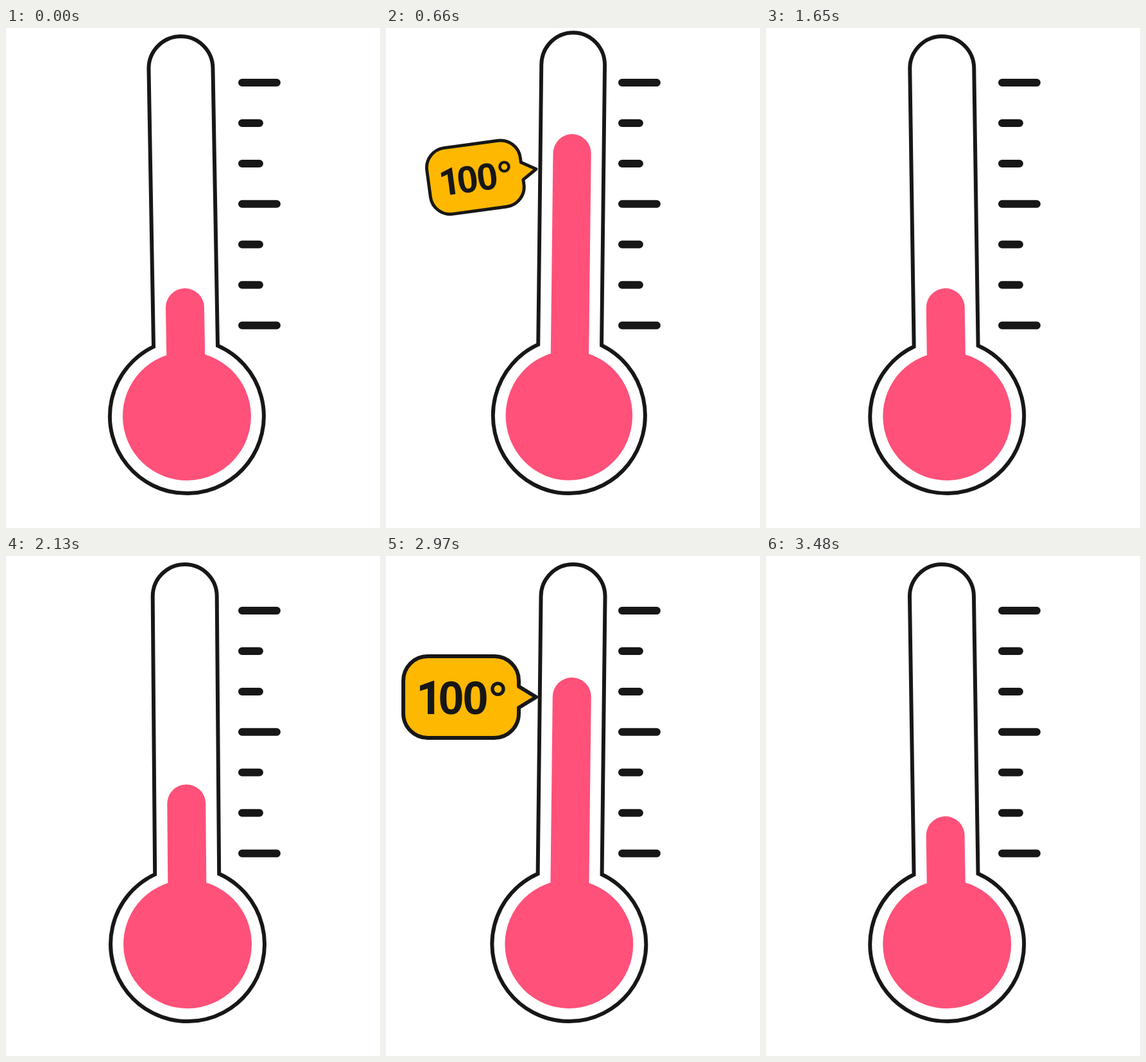
An HTML page that plays this animation: 583x778 px, repeating every 3.51 s.

```html
<!DOCTYPE html>
<html lang="en">
<head>
<meta charset="utf-8">
<title>Thermometer</title>
<style>
  html, body { margin: 0; width: 100%; height: 100%; overflow: hidden; background: #fff; }
  svg { display: block; }
  .line { fill: none; stroke: #171717; stroke-width: 6; }
  .liquid { fill: #ff5179; }
  #bubble path { fill: #ffb800; stroke: #171717; stroke-width: 6; stroke-linejoin: round; }
  text { font: bold 72px "Liberation Sans", Arial, sans-serif; fill: #171717; }
  .one { font-family: Roboto, sans-serif; }
  #ticks { stroke: #171717; stroke-width: 12; stroke-linecap: round; }
</style>
</head>
<body>
<svg width="583" height="778" viewBox="0 0 583 778">
  <path id="ticks"/>
  <!-- origin is the bottom of the bulb -->
  <g id="thermometer">
    <circle class="liquid" cy="-120" r="100"/>
    <path class="liquid" id="column"/>
    <path class="line" d="M-50-229V-661A50 50 0 0 1 50-661V-229A120 120 0 1 1-50-229Z"/>
  </g>
  <!-- origin is the tip of the pointer -->
  <g id="bubble">
    <path transform="translate(-234 -219.5)"
      d="M65 156H169A38 38 0 0 1 207 194V203L234 219.5L207 236V245A38 38 0 0 1 169 283H65A38 38 0 0 1 27 245V194A38 38 0 0 1 65 156Z"/>
    <text transform="translate(-234 -219.5)" x="47 81.5 119.5 160" y="246"><tspan class="one">1</tspan>00°</text>
  </g>
</svg>
<script>
const LOOP = 3510, CYCLE = 1815;
const $ = id => document.getElementById(id);
const progress = (t, from, to) => Math.min(1, Math.max(0, (t - from) / (to - from)));
const smooth = u => u * u * (3 - 2 * u);
const ease = (t, from, to) => smooth(progress(t, from, to));

$('ticks').setAttribute('d', Array.from({ length: 7 }, (_, i) =>
  `M368 ${85 + 62.95 * i}h${i % 3 ? 27 : 54}`).join(''));

function bubbleScale(t) {
  const v = 1 - progress(t, 570, 820);
  const grow = 1 - 1.5 * v ** 3 + 0.5 * v ** 2;
  return Math.max(0, grow * (1 - progress(t, 1200, 1385) ** 2));
}

function draw(time) {
  const t = time % LOOP % CYCLE;

  // Sway, with a brief stretch as the liquid overshoots
  const angle = -Math.cos(2 * Math.PI * t / CYCLE);
  const stretch = Math.sin(Math.PI * progress(t, 510, 750)) ** 2;
  $('thermometer').setAttribute('transform',
    `translate(284 724) rotate(${angle}) scale(${1 - 0.014 * stretch} ${1 + 0.0098 * stretch})`);

  const top = 405 - 237 * ease(t, 185, 630) + 21 * ease(t, 630, 810) + 216 * ease(t, 1200, 1620);
  $('column').setAttribute('d', `M-30-120V${top - 694}A30 30 0 0 1 30 ${top - 694}V-120Z`);

  const scale = bubbleScale(t);
  $('bubble').setAttribute('visibility', scale > 0.01 ? 'visible' : 'hidden');
  $('bubble').setAttribute('transform',
    `translate(234 219.5) rotate(${-42 * Math.max(0, 1 - scale)}) scale(${scale})`);
}

const start = performance.now();
function tick() {
  draw(performance.now() - start);
  requestAnimationFrame(tick);
}
tick();
</script>
</body>
</html>
```
